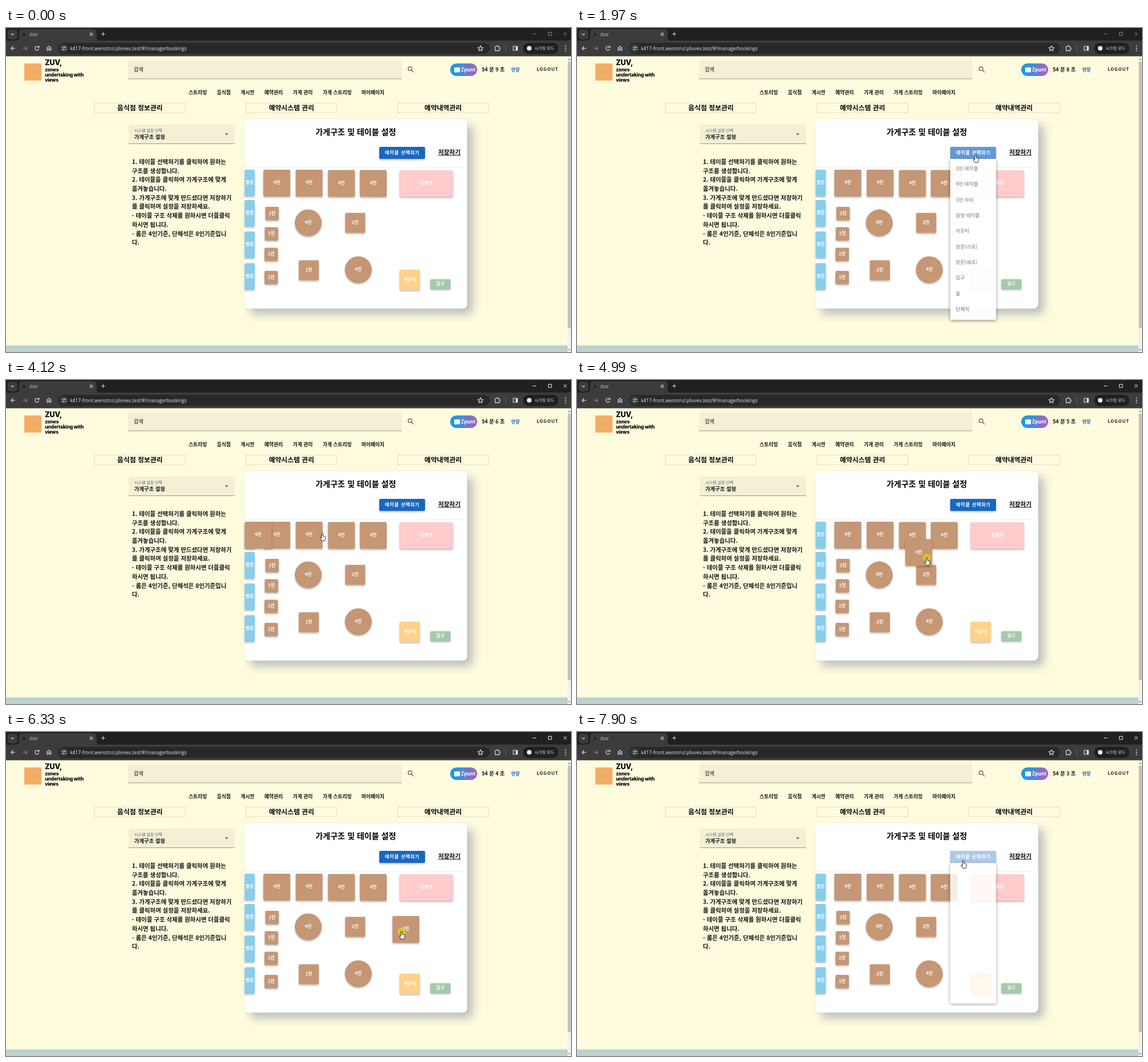
Write an HTML page that moves like this. It is 987x567 px and loops after 8 s.

```html
<!DOCTYPE html>
<html lang="ko">
<head>
<meta charset="utf-8">
<style>
html, body { margin: 0; width: 100%; height: 100%; overflow: hidden; background: #fffbde; }
svg { display: block; font-family: 'Noto Sans CJK KR', 'Noto Sans CJK JP', 'Noto Sans CJK', sans-serif; font-weight: 700; }
.ui { font-family: 'Open Sans', 'Noto Sans CJK KR', sans-serif; font-weight: 400; }
.logo { font-family: Inter, sans-serif; font-weight: 800; letter-spacing: -.2px; }
.line { fill: none; stroke: #e3e3e3; stroke-width: 1.1; }
.card { filter: drop-shadow(10px 10px 8px #bebebe); }
.item { filter: drop-shadow(0 2px 1.5px rgba(0,0,0,.26)); }
.panel { filter: drop-shadow(0 2px 3px rgba(0,0,0,.4)); }
</style>
</head>
<body>
<svg id="stage" width="987" height="567" viewBox="0 0 987 567"></svg>
<script>
const rect = (x, y, w, h, fill, rx = 0, more = '') =>
  `<rect x="${x}" y="${y}" width="${w}" height="${h}" rx="${rx}" fill="${fill}" ${more}/>`;
const text = (x, y, size, str, fill = '#111', more = '') =>
  `<text x="${x}" y="${y + size * .37}" font-size="${size}" fill="${fill}" ${more}>${str}</text>`;
const mid = (x, y, size, str, fill, more = '') =>
  text(x, y, size, str, fill, 'text-anchor="middle" ' + more);
const line = (d, more = '') => `<path class="line" d="${d}" ${more}/>`;

function browser() {
  return rect(0, 0, 987, 49, '#202020') + rect(3, 3, 17, 17, '#3c3c3c', 5) +
    line('M9 10l2.3 2.3L13.6 10') +
    '<path d="M17 22q6 0 6-6V8q0-6 6-6H152q6 0 6 6v8q0 6 6 6z" fill="#3c3c3c"/>' +
    rect(0, 22, 987, 27.5, '#3c3c3c') +
    '<circle cx="31.5" cy="11.5" r="2.5" fill="#222"/>' +
    text(41, 11.5, 7.5, 'ZUV', '#eee', 'class="ui"') +
    line('M146.5 8.5l5 5m0-5l-5 5M166.5 10.5h6.6M169.8 7.2v6.6') +
    `<g id="controls">${line('M920 10.5h6.5M947.5 7.5h5.5v5.5h-5.5zM974 7.5l5.5 5.5m0-5.5l-5.5 5.5',
      'style="stroke:inherit;stroke-width:1"')}</g>` +
    line('M16 35.5H9m3.3-3.3L9 35.5l3.3 3.3') +
    line('M29.5 35.5h7m-3.3-3.3l3.3 3.3-3.3 3.3', 'opacity=".45"') +
    line('M57 33.5a3.5 3.5 0 1 0 .5 3M57.8 31.3v2.7H55') +
    line('M71.8 39v-4.2l3.4-2.8 3.4 2.8V39h-2.2v-2.6h-2.4V39z') +
    rect(91, 26, 754, 19.5, '#282828', 10) +
    '<circle cx="101" cy="35.5" r="7.5" fill="#3c3c3c"/>' +
    line('M97.5 33.7h3M102.5 37.5h3M97.5 37.5h1M103.5 33.7h2') +
    '<g fill="none" stroke="#e3e3e3"><circle cx="101.8" cy="33.7" r="1"/><circle cx="100" cy="37.5" r="1"/></g>' +
    text(112, 35.5, 8.3, 'k417-front.wenotrul.plivvex.test/#/managerbookings', '#e6e6e6', 'class="ui"') +
    line('M828.8 31l1.4 3 3.2.4-2.4 2.2.6 3.2-2.8-1.6-2.8 1.6.6-3.2-2.4-2.2 3.2-.4z') +
    line('M854.5 32.5h2.5q0-1.7 1.3-1.7t1.3 1.7h2.2v2.3q1.6 0 1.6 1.2t-1.6 1.2v2.4h-7.3z') +
    rect(873, 30, 1, 11, '#666') + line('M886 32h7.5v7H886z') + rect(890.5, 32, 3.5, 7, '#e3e3e3') +
    rect(903, 26, 62, 19.5, '#202020', 10) + '<circle cx="914" cy="35.5" r="4" fill="#eee"/>' +
    text(923.5, 35.5, 7, '시크릿 모드', '#eee', 'font-weight="400"') +
    [31.5, 35.5, 39.5].map(y => `<circle cx="977.5" cy="${y}" r="1" fill="#e3e3e3"/>`).join('');
}

function header() {
  const logo = ['zones', 'undertaking with', 'views']
    .map((s, i) => text(68, 72.8 + i * 9, 8.4, s, '#000', 'class="logo"')).join('');
  const nav = [[335, '스트리밍'], [380.5, '음식점'], [422, '게시판'], [467.5, '예약관리'],
    [518.5, '가게 관리'], [578.5, '가게 스트리밍'], [641, '마이페이지']];
  const tabs = ['음식점 정보관리', '예약시스템 관리', '예약내역관리'];
  return rect(32, 62, 30, 30, '#f4ad66') + text(68, 60.5, 12.5, 'ZUV,', '#000', 'class="logo"') + logo +
    rect(213, 56, 478, 33, '#f4f0d5', 3) + rect(213, 88.5, 478, 1, '#99978a') +
    text(223, 72.5, 9.2, '검색', '#5c5a50') +
    '<g fill="none" stroke="#555" stroke-width="1.2"><circle cx="705.8" cy="71.2" r="3.3"/><path d="M708.2 73.7l3.8 3.8"/></g>' +
    rect(776, 62, 47, 22, 'url(#pill)', 11) + rect(783, 69, 10, 8.5, '#fff', 1) +
    text(795, 73, 8.4, 'Zpunt', '#fff') +
    '<g id="timer"></g>' + text(882.5, 72.5, 8.2, '연장', '#1867c0') +
    mid(946, 72.5, 8, 'LOGOUT', '#222', 'letter-spacing=".8"') +
    nav.map(([x, s]) => mid(x, 112.5, 8.7, s)).join('') +
    tabs.map((s, i) => rect(154.5 + i * 265, 131.5, 158.5, 17, 'none', 0, 'stroke="#dedcc8"') +
      mid(234 + i * 264.8, 139.5, 11.8, s, '#000')).join('');
}

function guide() {
  const rows = ['1. 테이블 선택하기를 클릭하여 원하는', '구조를 생성합니다.', '2. 테이블을 클릭하여 가게구조에 맞게',
    '옮겨놓습니다.', '3. 가게구조에 맞게 만드셨다면 저장하기', '를 클릭하여 설정을 저장하세요.',
    '- 테이블 구조 삭제를 원하시면 더블클릭', '하시면 됩니다.', '- 룸은 4인기준, 단체석은 8인기준입니', '다.'];
  return rect(214, 169, 186, 33.5, '#f4f0d5', 3) + rect(214, 202, 186, 1, '#99978a') +
    text(224, 179, 7, '시스템 설정 선택', '#66645a', 'font-weight="500"') +
    text(224, 191, 9.3, '가게구조 설정') + '<path d="M382.5 184.5h6l-3 3z" fill="#555"/>' +
    rows.map((s, i) => text(220, 234 + i * 15.72, 10.4, s)).join('');
}

const BROWN = '#c59774', SKY = '#87ceeb';
const item = (x, y, w, h, fill, label, rx = 2) =>
  `<g class="item">${rect(x, y, w, h, fill, rx)}</g>` + mid(x + w / 2, y + h / 2 - 1, 7.8, label, '#fff');

function floor() {
  const all = (spots, w, fill, label, h = w, rx = 2) =>
    spots.map(([x, y]) => item(x, y, w, h, fill, label, rx)).join('');
  return all([[417, 248], [417, 301], [417, 356], [417, 411.5]], 17.5, SKY, '창문', 46.5) +
    all([[449.5, 248], [506, 248], [562.5, 248.5], [618, 248.5]], 47, BROWN, '4인') +
    all([[453, 313], [452, 348.5], [451.5, 384.5], [451.5, 425]], 23.5, BROWN, '1인') +
    all([[504.5, 317.5], [592, 399.5]], 47, BROWN, '4인', 47, 23.5) +
    all([[592.5, 323.5], [511.5, 406.5]], 35, BROWN, '2인') +
    item(687.5, 249, 93.5, 46.5, '#ffcbcb', '단체석') +
    item(687.5, 423, 35.5, 35.5, '#ffd28a', '카운터') +
    item(741, 439.5, 35.5, 17.5, '#a5c8aa', '입구');
}

function menu() {
  const names = ['2인 테이블', '4인 테이블', '1인 자리', '원형 테이블', '카운터',
    '창문(가로)', '창문(세로)', '입구', '룸', '단체석'];
  return `<g id="menu"><g class="panel">${rect(652, 229, 80, 289, '#fff', 2)}</g><g id="names">` +
    names.map((s, i) => text(661.5, 246.5 + i * 28, 8.6, s)).join('') + '</g></g>';
}

const stage = document.getElementById('stage');
stage.innerHTML =
  '<defs><linearGradient id="pill"><stop stop-color="#129de6"/><stop offset=".35" stop-color="#3c8fdc"/><stop offset="1" stop-color="#b45db4"/></linearGradient></defs>' +
  rect(0, 49, 987, 518, '#fffbde') + rect(0, 555.5, 981, 12, '#bdd1cd') + header() + guide() +
  `<g class="card">${rect(417, 160, 388.5, 331, '#fff', 8)}</g>` + rect(417, 243.5, 385, 1, '#f0f0f0') +
  mid(611, 181.5, 14, '가게구조 및 테이블 설정', '#000') +
  `<g class="item">${rect(652, 208, 80, 21, '#1867c0', 2)}</g>` + rect(652, 208, 80, 21, '#fff', 2, 'id="glow"') +
  mid(692.3, 217.5, 8.2, '테이블 선택하기', '#fff', 'letter-spacing=".7"') +
  text(755, 217, 10.6, '저장하기', '#000') + rect(755, 222, 39, 1, '#000') +
  floor() + `<g id="piece">${item(0, 0, 47, 47, BROWN, '4인')}</g>` + menu() +
  rect(981, 49, 6, 518, '#f1f1f1') + rect(981.5, 59, 5, 466, '#bfbfbf') +
  '<path d="M982 56h4l-2-2.5zM982 562h4l-2 2.5z" fill="#777"/>' + browser() +
  '<circle id="press" r="7" fill="#e2c81e" opacity=".85"/>' +
  '<g id="cursor" fill="#fff" stroke="#111" stroke-width=".9" stroke-linejoin="round">' +
  '<path id="arrow" d="M0 0V12l2.8-2.6 1.8 4 1.8-.8-1.8-3.9h3.9z"/>' +
  '<path id="hand" d="M-1.2 1a1.2 1.2 0 0 1 2.4 0V5l3.2.8q1.3.4 1.2 1.8l-.5 3.2-.9 2.6H-.8L-4 8.8q-.2-1.6 1.5-1l1.3 1z"/></g>';

const [controls, timer, glow, piece, menuBox, names, press, cursor, arrow, hand] =
  ['controls', 'timer', 'glow', 'piece', 'menu', 'names', 'press', 'cursor', 'arrow', 'hand']
    .map(id => document.getElementById(id));

const clamp = v => Math.max(0, Math.min(1, v));
const linear = q => q, smooth = q => q * q * (3 - 2 * q);
const out = k => q => 1 - (1 - q) ** k;

// y of cubic-bezier(x1, 0, x2, 1) at x
function bezier(x1, x2, x) {
  let lo = 0, hi = 1, s;
  for (let i = 0; i < 24; i++) {
    s = (lo + hi) / 2;
    const u = 1 - s;
    if (3 * u * u * s * x1 + 3 * u * s * s * x2 + s ** 3 < x) lo = s; else hi = s;
  }
  return s * s * (3 - 2 * s);
}

// [time, x, y, easing of x, easing of y] for the move that ends there
const PATH = [
  [140, 978, 565], [930, 740, 253, out(1.6)], [960, 740, 253], [1500, 696, 222, smooth],
  [2340, 696, 222], [3130, 696, 270, smooth], [3230, 696, 270], [3460, 696, 277, smooth],
  [3720, 696, 277], [4120, 553, 268, linear], [4460, 433, 275, linear], [4680, 433, 275],
  [5460, 691, 349, out(2.3), out(1.3)], [6600, 691, 349], [7120, 677, 230, smooth],
  [7200, 677, 230], [7500, 675, 225, smooth]];

function pointer(t) {
  const i = PATH.findIndex(k => k[0] > t);
  if (i < 0) return PATH[PATH.length - 1].slice(1, 3);
  if (!i) return PATH[0].slice(1, 3);
  const a = PATH[i - 1], b = PATH[i], q = (t - a[0]) / (b[0] - a[0]);
  const ex = b[3] || linear, ey = b[4] || ex;
  return [a[1] + (b[1] - a[1]) * ex(q), a[2] + (b[2] - a[2]) * ey(q)];
}

function ramp(keys, t) {
  const i = keys.findIndex(k => k[0] > t);
  if (i < 1) return keys[i ? keys.length - 1 : 0][1];
  const [a, b] = [keys[i - 1], keys[i]];
  return a[1] + (b[1] - a[1]) * (t - a[0]) / (b[0] - a[0]);
}

const OPEN = [1795, 7788], CLOSE = 3670;
const PRESSES = [[1690, 1790], [3620, 3720], [4680, 5840], [6330, 6400], [6470, 6550], [7690, 7780]];
const TICKS = [900, 2160, 3640, 4780, 6050, 7300];
const GLOW = [[0, .1], [60, .6], [112, .65], [175, .33], [545, .33], [700, .24]];
const show = (el, on) => el.setAttribute('visibility', on ? 'visible' : 'hidden');
const move = (el, x, y) => el.setAttribute('transform', `translate(${x} ${y})`);
let shown;

function draw(t) {
  const [x, y] = pointer(t);
  const onButton = t > 140 && x > 652 && x < 732 && y > 208 && y < 231;
  const isHand = onButton || (t > 1500 && t < 6560);
  move(cursor, x, y);
  move(press, x, y);
  show(arrow, t >= 140 && !isHand);
  show(hand, t >= 140 && isHand);
  show(press, PRESSES.some(([a, b]) => t >= a && t < b));

  const since = t - (t >= OPEN[1] ? OPEN[1] : OPEN[0]);
  const closing = t < OPEN[1] ? clamp((t - CLOSE) / 125) : 0;
  const grow = since < 0 ? 0 : bezier(0, .2, clamp(since / 225)) * (1 - closing ** 2);
  show(menuBox, grow > 0);
  menuBox.setAttribute('opacity', grow);
  menuBox.setAttribute('transform', `translate(0 229) scale(1 ${.07 + .93 * grow}) translate(0 -229)`);
  names.setAttribute('opacity', clamp((bezier(.4, .2, clamp(since / 450)) - .33) / .67) * (1 - closing));
  glow.setAttribute('opacity', grow > 0 ? ramp(GLOW, since) * (1 - closing) : onButton ? .1 : 0);

  // the dragged table trails the pointer slightly
  const [px, py] = pointer(Math.max(4680, Math.min(t - 51, 5500)));
  show(piece, t >= 3700 && t < 6560);
  move(piece, px - 16, py - 27);

  controls.setAttribute('stroke', t < 3620 ? '#858585' : '#f0f0f0');
  const left = 9 - TICKS.filter(k => t >= k).length;
  if (left !== shown) timer.innerHTML = text(831, 72.5, 9, `54 분 ${shown = left} 초`);
}

function loop() {
  draw(performance.now() % 8000);
  requestAnimationFrame(loop);
}
loop();
</script>
</body>
</html>
```
